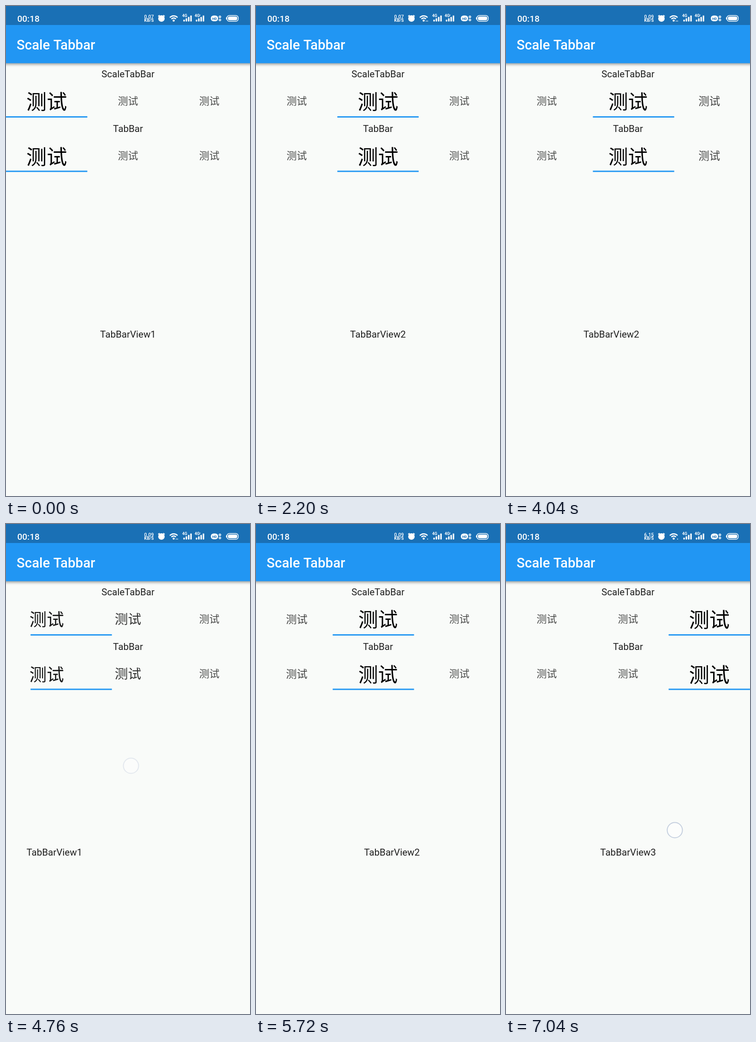
Animation, 529 px wide and 1058 px high, one loop 7.08 s. Source, as an HTML page with a canvas:

```html
<!DOCTYPE html>
<html lang="en">
<head>
<meta charset="utf-8">
<title>Scale Tabbar</title>
<style>
html, body { margin: 0; width: 100%; height: 100%; overflow: hidden; background: #f9fbf9; }
canvas { display: block; }
</style>
</head>
<body>
<canvas id="stage" width="529" height="1058"></canvas>
<script>
const ctx = document.getElementById('stage').getContext('2d');
const W = 529, H = 1058, LOOP = 7080, FRAME = 40;
const BLUE = '#2196f3', STATUS = '#1a70b5', PAPER = '#f9fbf9';
const ROBOTO = 'Roboto, sans-serif';
const CJK = '"Noto Sans CJK SC", "Noto Sans CJK", sans-serif';

const taps = [
  { touch: 1480, move: 1890, from: 0, to: 1, x: 264, y: 212 },
  { touch: 2320, move: 2730, from: 1, to: 2, x: 440, y: 212 }
];
// x, y: where the finger leaves the screen
const swipes = [
  { release: 3790, from: 2, to: 1, x: 330, y: 540 },
  { release: 4680, from: 1, to: 0, x: 271, y: 522 },
  { release: 5450, from: 0, to: 1, x: 90, y: 540 },
  { release: 6220, from: 1, to: 2, x: 61, y: 560 }
];
const DRAG = 250, REACH = 0.45;
const wifiDots = [0, 1, 0, 1, 2, 2, 1, 1, 2, 2, 1, 1, 1, 1, 1];

const clamp = v => Math.max(0, Math.min(1, v));

// cubic-bezier(.25, .1, .25, 1)
function ease(x) {
  const bez = (a, b, u) => 3 * a * u * (1 - u) ** 2 + 3 * b * u * u * (1 - u) + u ** 3;
  let lo = 0, hi = 1;
  for (let i = 0; i < 20; i++) {
    const mid = (lo + hi) / 2;
    if (bez(0.25, 0.25, mid) < x) lo = mid; else hi = mid;
  }
  return bez(0.1, 1, lo);
}

const dragged = (s, t) => REACH * clamp((t - s.release + DRAG) / DRAG) ** 2;

// Finger drag, then an overdamped spring
function swipeProgress(s, t) {
  const dt = (t - s.release) / 1000;
  return dt < 0 ? dragged(s, t) : 1 - 0.665 * Math.exp(-9.08 * dt) + 0.115 * Math.exp(-22.03 * dt);
}

function pageAt(t) {
  let page = 0;
  for (const m of taps)
    if (t > m.move) page = m.from + (m.to - m.from) * ease(clamp((t - m.move) / 300));
  for (const s of swipes)
    if (t > s.release - DRAG) page = s.from + (s.to - s.from) * swipeProgress(s, t);
  return page;
}

function text(str, x, y, size, { weight = 400, color = '#fff', align = 'center', family = ROBOTO } = {}) {
  ctx.font = `${weight} ${size}px ${family}`;
  ctx.fillStyle = color;
  ctx.textAlign = align;
  ctx.fillText(str, x, y);
}

function rect(x, y, w, h, color) {
  ctx.fillStyle = color;
  ctx.fillRect(x, y, w, h);
}

function pill(x, y, w, h, r) {
  ctx.beginPath();
  ctx.roundRect(x, y, w, h, r);
}

function disc(x, y, r, color = '#fff') {
  ctx.fillStyle = color;
  ctx.beginPath();
  ctx.arc(x, y, r, 0, 7);
  ctx.fill();
}

function line(x1, y1, x2, y2) {
  ctx.beginPath();
  ctx.moveTo(x1, y1);
  ctx.lineTo(x2, y2);
  ctx.stroke();
}

function wifi(dots) {
  const x = 363.5, y = 32.5, span = 0.83;
  ctx.lineWidth = 2.6;
  for (const r of [11.3, 6.6]) {
    ctx.beginPath();
    ctx.arc(x, y, r, -Math.PI / 2 - span, -Math.PI / 2 + span);
    ctx.stroke();
  }
  disc(x, y - 1, 2.3);
  if (dots > 0) disc(372, 32.5, 1);
  if (dots > 1) disc(369, 32.5, 1);
}

function signal(x) {
  text('4G', x, 24, 8.5, { weight: 700, align: 'left' });
  [4, 7, 10, 13].forEach((h, i) => {
    ctx.fillStyle = '#fff';
    pill(x + 2.5 + i * 5, 33.5 - h, 3.2, h, 1);
    ctx.fill();
  });
}

function statusBar(t) {
  rect(0, 0, W, 41, STATUS);
  ctx.strokeStyle = '#fff';
  text('00:18', 24.5, 33.5, 19, { weight: 500, align: 'left' });
  text(t < 2760 ? '0.07' : t < 5760 ? '0.09' : '6.15', 310, 26.5, 10.6, { weight: 500 });
  text('KB/S', 310, 34.3, 9.2, { weight: 700 });

  disc(337, 27, 7);
  ctx.lineWidth = 2;
  line(330, 22.5, 333, 19.8);
  line(344, 22.5, 341, 19.8);

  wifi(wifiDots[Math.floor(t / 500)]);
  signal(382);
  signal(409);
  rect(420, 18.5, 1.2, 2.5, '#fff');

  ctx.fillStyle = '#fff';
  pill(444, 20.5, 16, 12.5, 6.2);
  ctx.fill();
  text('HD', 452, 29.5, 7.5, { weight: 700, color: STATUS });
  ctx.lineWidth = 1.6;
  for (const y of [23.3, 30]) {
    ctx.beginPath();
    ctx.arc(463.8, y, 1.8, 0, 7);
    ctx.stroke();
  }

  ctx.lineWidth = 1.5;
  pill(479, 20.5, 24.5, 12.5, 5);
  ctx.stroke();
  ctx.fillStyle = '#fff';
  pill(481.2, 22.7, 20, 8.1, 3);
  ctx.fill();
  rect(477, 24.5, 1.6, 4.5, '#fff');
}

function appBar() {
  ctx.save();
  ctx.shadowColor = 'rgba(0,0,0,.4)';
  ctx.shadowBlur = 6;
  ctx.shadowOffsetY = 2;
  rect(-10, 41, W + 20, 82.5, BLUE);
  ctx.restore();
  text('Scale Tabbar', 23, 94, 29.4, { weight: 500, align: 'left' });
}

// Labels grow from half to full size as their tab becomes current
function tabBar(page, centre, drop, lineY) {
  const tab = W / 3;
  for (let i = 0; i < 3; i++) {
    const near = clamp(1 - Math.abs(page - i));
    const size = 22.04 * (1 + near);
    text('测试', tab * (i + 0.5), centre + drop * near + size * 0.38, size,
      { color: `rgba(0,0,0,${0.7 + 0.3 * near})`, family: CJK });
  }
  rect(page * tab, lineY, tab, 2.9, BLUE);
}

function ring(x, y, alpha) {
  if (alpha <= 0) return;
  ctx.globalAlpha = alpha;
  disc(x, y, 17, 'rgba(255,255,255,.7)');
  ctx.strokeStyle = '#b3c1d6';
  ctx.lineWidth = 2;
  ctx.beginPath();
  ctx.arc(x, y, 16.5, 0, 7);
  ctx.stroke();
  ctx.globalAlpha = 1;
}

const touchAlpha = (t, down, up) => Math.min(clamp((t - down + FRAME) / 160), clamp(1 - (t - up) / 120));

function touches(t) {
  for (const m of taps) ring(m.x, m.y, touchAlpha(t, m.touch, m.touch + 160));
  for (const s of swipes) {
    const left = (REACH - dragged(s, t)) * W * (s.to - s.from);
    ring(s.x + left, s.y, touchAlpha(t, s.release - DRAG - 60, s.release));
  }
  ring(366, 661, touchAlpha(t, 6960, LOOP));
}

function draw(now) {
  const t = Math.floor((now % LOOP) / FRAME) * FRAME;
  const page = pageAt(t), ink = { color: '#1f1f1f' };
  rect(0, 0, W, H, PAPER);
  appBar();
  statusBar(t);
  text('ScaleTabBar', W / 2, 154, 20.57, ink);
  tabBar(page, 205, 1.3, 238);
  text('TabBar', W / 2, 271.6, 20.57, ink);
  tabBar(page, 322.5, 2.8, 355.5);
  for (let i = 0; i < 3; i++)
    text('TabBarView' + (i + 1), W * (i + 0.5 - page), 715.5, 20.57, ink);
  touches(t);
}

const start = performance.now();
(function tick() {
  draw(performance.now() - start);
  requestAnimationFrame(tick);
})();
</script>
</body>
</html>
```
